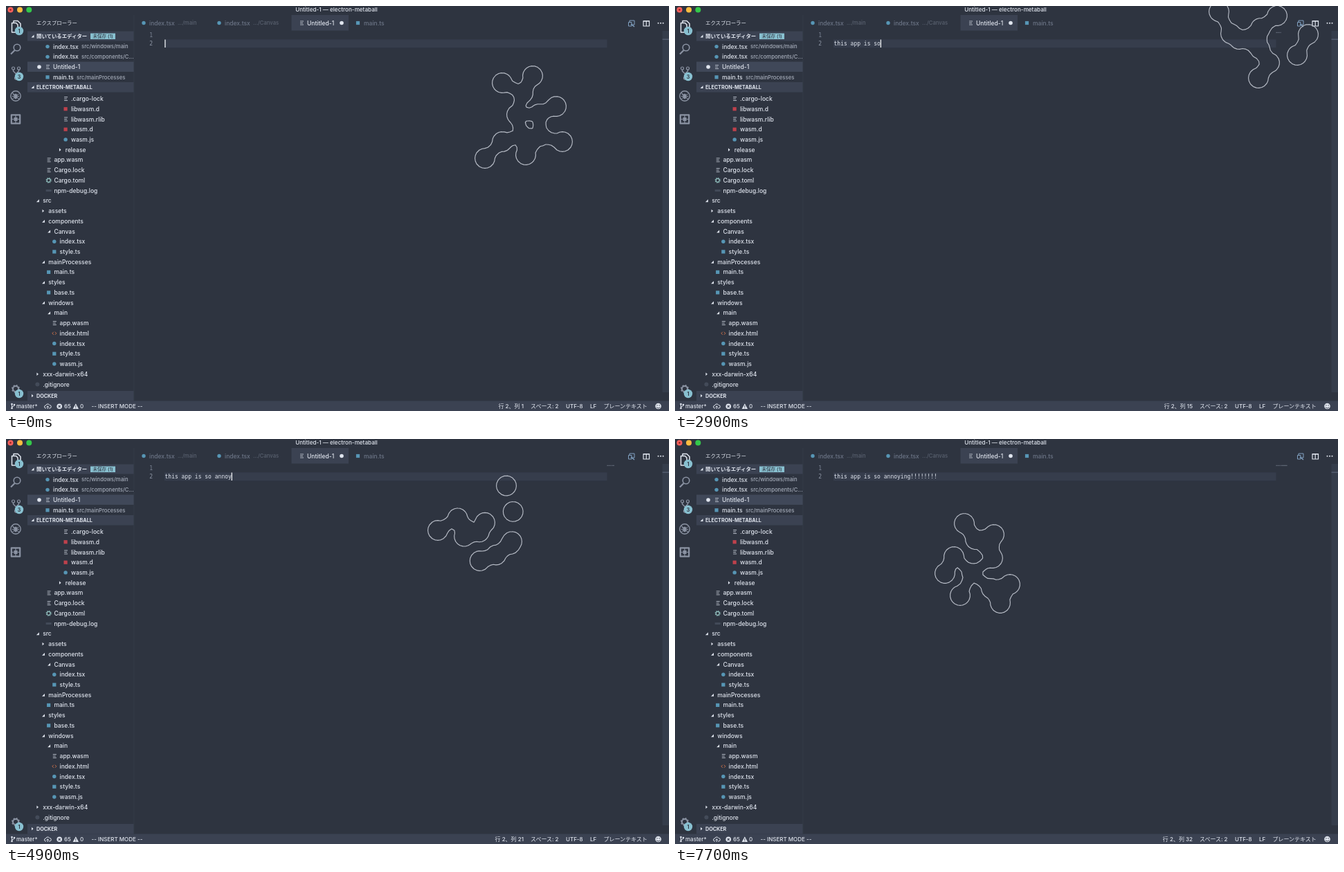
Write an HTML page that moves like this. It is 958 by 585 pixels and loops after 7.8 s.

```html
<!DOCTYPE html>
<html lang="ja">
<head>
<meta charset="utf-8">
<style>
html, body { margin: 0; width: 100%; height: 100%; overflow: hidden; background: #2e3440; }
svg { display: block; }
text { font-family: Inter, "Noto Sans CJK JP", "Noto Sans CJK", sans-serif; font-weight: 500; white-space: pre; }
.mono { font-family: "DejaVu Sans Mono", monospace; font-weight: 400; }
.bold { font-weight: 700; }
</style>
</head>
<body>
<svg id="stage" width="958" height="585" viewBox="0 0 958 585"></svg>
<script>
const stage = document.getElementById('stage');
const BG = '#2e3440', PANEL = '#3b4252', FG = '#e0e5ee', TEAL = '#88c0d0', DIM = '#6c7586', BLUE = '#5796b5';

function add(tag, attrs, content = '') {
  const el = document.createElementNS('http://www.w3.org/2000/svg', tag);
  for (const key in attrs) el.setAttribute(key, attrs[key]);
  el.textContent = content;
  return stage.appendChild(el);
}
const rect = (x, y, width, height, fill) => add('rect', { x, y, width, height, fill });
const dot = (cx, cy, r, fill) => add('circle', { cx, cy, r, fill });
const line = (d, stroke = FG, width = 1) =>
  add('path', { d, stroke, fill: 'none', 'stroke-width': width, 'stroke-linejoin': 'round' });
// y is the middle of the line of text
const label = (x, y, s, size = 8.5, fill = FG, more = {}) =>
  add('text', { x, y: y + size * 0.36, 'font-size': size, fill, ...more }, s);
const BOLD = { class: 'bold' };

const icons = {
  file: (x, y) => line(`M${x - 2} ${y - 2.5}h5M${x - 2} ${y}h4M${x - 2} ${y + 2.5}h5`, '#c3c9d4', 0.9),
  react: (x, y) => dot(x, y, 2.7, BLUE),
  ts: (x, y) => rect(x - 2.6, y - 2.6, 5.2, 5.2, BLUE),
  d: (x, y) => rect(x - 2.6, y - 2.6, 5.2, 5.2, '#bf414c'),
  npm: (x, y) => rect(x - 4, y - 1.5, 8, 3, '#434b59'),
  git: (x, y) => dot(x, y, 3, '#434b59'),
  html: (x, y) => line(`M${x - 1} ${y - 2}l-2 2l2 2M${x + 1} ${y - 2}l2 2l-2 2`, '#c9704b'),
  gear: (x, y) => gear(x, y, 2.5, '#8fbcbb', 1.2),
  open: (x, y) => add('path', { d: `M${x + 2.5} ${y - 2}v4h-4z`, fill: FG }),
  shut: (x, y) => add('path', { d: `M${x - 1} ${y - 2.3}l2.6 2.3l-2.6 2.3z`, fill: FG })
};
function gear(x, y, r, color, width) {
  add('circle', { cx: x, cy: y, r, fill: 'none', stroke: color, 'stroke-width': width });
  add('circle', { cx: x, cy: y, r: r + 1, fill: 'none', stroke: color, 'stroke-width': width,
    'stroke-dasharray': `${(r + 1) * Math.PI / 8}` });
}
function badge(y, s) {
  dot(19, y, 6.2, TEAL);
  label(19, y, s, 7, BG, { 'text-anchor': 'middle', ...BOLD });
}

function drawWindow() {
  rect(0, 0, 958, 585, BG);
  dot(6.5, 5.5, 4, '#fc615c');
  dot(6.5, 5.5, 1.3, '#8e2420');
  dot(20, 5.5, 4, '#fdbc40');
  dot(33.3, 5.5, 4, '#34c84a');
  label(477.5, 5.5, 'Untitled-1 — electron-metaball', 8.15, FG, { 'text-anchor': 'middle' });
  rect(184.5, 13, 0.8, 557, '#353c4a');
}

function drawActivityBar() {
  const grey = '#8b93a3';
  line('M11 24V21.500H17L21 25.500V34H18M8.500 24.500H14.500L17 27V38H8.500Z', FG, 1.5);
  badge(36, '1');
  add('circle', { cx: 16, cy: 60, r: 4.8, fill: 'none', stroke: grey, 'stroke-width': 1.6 });
  line('M12.500 64L7 69.500', grey, 2.2);
  line('M10.500 92V94L14.500 98V103M18.500 92V94L14.500 98', grey, 1.5);
  for (const [x, y] of [[10.5, 90], [18.5, 90], [14.5, 104]])
    add('circle', { cx: x, cy: y, r: 2, fill: BG, stroke: grey, 'stroke-width': 1.2 });
  badge(102, '3');
  add('circle', { cx: 14, cy: 130, r: 7.2, fill: 'none', stroke: grey, 'stroke-width': 1.4 });
  add('ellipse', { cx: 14, cy: 130.5, rx: 2.4, ry: 3.8, fill: grey });
  line('M9.500 127L18.500 134M9.500 134L18.500 127M9 130.500H19M9 125L19 135', grey, 1);
  line('M7.800 157.300H20.200V169.700H7.800Z', grey, 2.2);
  line('M14 157V161M14 166V170M8 163.500H11.500M16.500 163.500H20', grey, 1.2);
  rect(11.5, 161, 5, 5, grey);
  gear(14, 553, 4, grey, 2);
  badge(560, '1');
}

function drawSidebar() {
  label(44, 24.5, 'エクスプローラー', 7.4);
  rect(31, 36.5, 153.5, 14, PANEL);
  icons.open(38, 43.5);
  label(44, 43.5, '開いているエディター', 7.4, FG, BOLD);
  rect(122, 39.5, 36, 8.5, TEAL);
  label(140, 43.7, '未保存 (1)', 6.6, BG, { 'text-anchor': 'middle' });

  rect(31, 80.5, 153.5, 14.5, '#404859');
  dot(48, 88, 2.8, FG);
  const editors = [['react', 'index.tsx', 109, 'src/windows/main'], ['react', 'index.tsx', 109, 'src/components/C...'],
    ['file', 'Untitled-1', 0, ''], ['ts', 'main.ts', 102, 'src/mainProcesses']];
  editors.forEach(([icon, name, x, path], i) => {
    const y = 58.6 + i * 14.73;
    icons[icon](60, y);
    label(68, y, name);
    label(x, y, path, 7.7, '#a7aebb');
  });

  rect(31, 110, 153.5, 14.5, PANEL);
  icons.open(38, 117);
  label(44, 117, 'ELECTRON-METABALL', 7.2, FG, BOLD);

  const tree = `4 file .cargo-lock|4 d libwasm.d|4 file libwasm.rlib|4 d wasm.d|4 react wasm.js|3 shut release
1 file app.wasm|1 file Cargo.lock|1 gear Cargo.toml|1 npm npm-debug.log|-1 open src|0 shut assets|0 open components
1 open Canvas|2 react index.tsx|2 ts style.ts|0 open mainProcesses|1 ts main.ts|0 open styles|1 ts base.ts
0 open windows|1 open main|2 file app.wasm|2 html index.html|2 react index.tsx|2 ts style.ts|2 react wasm.js
-1 shut xxx-darwin-x64|-1 git .gitignore`;
  tree.split(/[|\n]/).forEach((row, i) => {
    const [depth, icon, name] = row.split(' ');
    const x = 61.3 + depth * 8.15, y = 134 + i * 14.73;
    icons[icon](x - 7.8, y);
    label(x, y, name);
  });

  rect(31, 556, 153.5, 14.5, PANEL);
  icons.shut(38, 563);
  label(44, 563, 'DOCKER', 7.2, FG, BOLD);
}

function drawEditor() {
  rect(412.5, 13, 82.5, 22.5, PANEL);
  icons.react(199, 24.5);
  label(207, 24.5, 'index.tsx', 8.5, DIM);
  label(248, 24.5, '.../main', 7.7, '#59616f');
  icons.react(308, 24.5);
  label(316, 24.5, 'index.tsx', 8.5, DIM);
  label(357, 24.5, '.../Canvas', 7.7, '#59616f');
  icons.file(427, 24.5);
  label(435, 24.5, 'Untitled-1');
  dot(485, 24.5, 2.8, FG);
  icons.ts(508.5, 24.5);
  label(517, 24.5, 'main.ts', 8.5, DIM);

  line('M901 23V21H908V27H905M899.500 23.500H904V29H899.500Z', '#81a1c1');
  line('M903 26L908 30', '#81a1c1', 1.4);
  line('M921 21.500H929.500V29H921ZM925.200 21.500V29', FG, 1.2);
  line('M921 21.800H929.500', FG, 1.6);
  for (const x of [942.5, 946, 949.5]) dot(x, 24.8, 1, FG);

  rect(229, 48.3, 639.5, 11.8, '#363d4c');
  rect(948.5, 36, 9.5, 522, '#353d4b');
  rect(948.5, 47.5, 9.5, 1.3, '#596275');
  label(212, 42, '1', 8, '#7b8494', { class: 'mono', 'text-anchor': 'end' });
  label(212, 54, '2', 8, '#8f97a6', { class: 'mono', 'text-anchor': 'end' });
}

function drawStatusBar() {
  rect(0, 570.5, 958, 14.5, PANEL);
  line('M8.500 575.500V581M12 576.500C12 579 8.500 578 8.500 580', FG);
  dot(8.5, 575, 1.3, FG);
  dot(12, 576, 1.3, FG);
  dot(8.5, 581, 1.3, FG);
  label(15, 578, 'master*', 8);
  line('M58 581H57.500A2 2 0 0 1 57.500 577A3 3 0 0 1 63 576.500A2.200 2.200 0 0 1 63 581H62M60.200 582V578M58.500 579.500L60.200 577.800L62 579.500', FG);
  dot(77.2, 578.3, 3.8, FG);
  line('M75.700 576.800L78.700 579.800M78.700 576.800L75.700 579.800', PANEL, 1.1);
  label(84, 578, '65', 8);
  add('path', { d: 'M100.800 574.300L105 582H96.600Z', fill: FG });
  line('M100.800 577V579.500M100.800 580.300V581.200', PANEL, 1);
  label(107, 578, '0', 8);
  label(123.5, 578, '-- INSERT MODE --', 8);
  label(758, 578, 'スペース: 2', 8);
  label(809, 578, 'UTF-8', 8);
  label(844, 578, 'LF', 8);
  label(863.5, 578, 'プレーンテキスト', 8);
  dot(942.5, 578, 4.3, FG);
  dot(940.9, 576.8, 0.7, PANEL);
  dot(944.1, 576.8, 0.7, PANEL);
  line('M940 579.200A2.700 2.700 0 0 0 945 579.200', PANEL, 1);
}

drawWindow();
drawActivityBar();
drawSidebar();
drawEditor();
drawStatusBar();

const position = label(748, 578, '', 8, FG, { 'text-anchor': 'end' });
const typed = label(229.5, 54, '', 8, FG, { class: 'mono' });
const caret = rect(229, 48.5, 1.3, 11.5, '#f0f2f5');
const minimap = line('', '#818999', 0.9);
const outline = line('', '#b8bdc7', 1.15);
outline.setAttribute('stroke-linecap', 'round');

const LOOP = 7800, STEP = 100;
const MESSAGE = 'this app is so annoying!!!!!!!!';
const typing = [[0, 0], [500, 0], [1800, 10], [2900, 14], [4100, 17], [5700, 23], [6500, 27], [7100, 31], [LOOP, 31]];

function typedLength(t) {
  const i = typing.findIndex(k => k[0] > t);
  const [t0, n0] = typing[i - 1], [t1, n1] = typing[i];
  return Math.floor(n0 + (n1 - n0) * (t - t0) / (t1 - t0) + 1e-6);
}

// Ball centres as x, y pairs at each pose; balls closer than LINK are bridged
const BALLS = 12, RADIUS = 14.4, LINK = 37.5;
const poses = [
  { t: 0, at: [761, 101, 795, 145, 804, 196, 772, 188, 751, 215, 692, 220, 717, 196, 717, 111, 747, 126, 738, 157, 770, 156, 745, 187] },
  { t: 1800, at: [912, 28, 930, 58, 959, 75, 914, 80, 927, 97, 883, 104, 870, 62, 887, 34, 862, 11] },
  { t: 2900, at: [846, 32, 915, 41, 899, 71, 859, 82, 843, 104, 845, 62, 815, 48, 786, 8, 803, 40, 870, 14] },
  { t: 4100, at: [803, 56, 825, 91, 810, 121, 790, 98, 780, 149, 755, 140, 721, 101, 697, 86, 723, 71, 763, 119, 756, 86] },
  { t: 5700, at: [636, 94, 643, 126, 659, 181, 667, 215, 636, 196, 614, 214, 603, 186, 558, 172, 586, 166, 612, 154, 636, 160] },
  { t: 6500, at: [581, 199, 607, 207, 646, 250, 624, 266, 600, 288, 555, 282, 538, 253, 544, 191, 560, 229, 586, 264, 603, 238] },
  { t: 7700, at: [418, 122, 461, 138, 459, 172, 484, 210, 470, 237, 412, 226, 390, 194, 403, 170, 434, 145, 429, 194, 457, 216] }
];
// Spare balls merge with the last one listed
for (const { at } of poses)
  while (at.length < BALLS * 2) at.push(...at.slice(-2));

function slope(i, j) {
  const a = poses[Math.max(i - 1, 0)], b = poses[Math.min(i + 1, poses.length - 1)];
  return (b.at[j] - a.at[j]) / (b.t - a.t);
}

// Cubic Hermite path through the poses
function coordinate(t, j) {
  const i = poses.findLastIndex(p => p.t <= Math.min(t, 7699));
  const a = poses[i], b = poses[i + 1], span = b.t - a.t, u = Math.min(1, (t - a.t) / span);
  const v = 1 - u;
  return v * v * ((1 + 2 * u) * a.at[j] + u * span * slope(i, j)) +
    u * u * ((3 - 2 * u) * b.at[j] - v * span * slope(i + 1, j));
}

// Every ball is a link to itself; longer links have a thinner waist
function findLinks(balls) {
  const links = [];
  balls.forEach(([x, y], i) => {
    for (const [x2, y2] of balls.slice(i)) {
      const dx = x2 - x, dy = y2 - y, d2 = dx * dx + dy * dy;
      if (d2 < LINK * LINK) links.push({ x, y, dx, dy, d2: d2 || 1, waist: 2 * d2 / (LINK * LINK) });
    }
  });
  return links;
}

function depth(px, py, links) {
  let best = -1e3;
  for (const { x, y, dx, dy, d2, waist } of links) {
    const u = Math.max(0, Math.min(1, ((px - x) * dx + (py - y) * dy) / d2));
    const reach = RADIUS * (1 - waist * u * (1 - u));
    best = Math.max(best, reach - Math.hypot(px - x - u * dx, py - y - u * dy));
  }
  return best;
}

// Marching squares along the edge of all links
function contour(links) {
  const G = 4, cols = 241, rows = 90, field = [];
  for (let r = 0; r < rows; r++)
    for (let c = 0; c < cols; c++) field.push(depth(c * G, r * G, links));
  const corners = [[0, 0], [1, 0], [1, 1], [0, 1]];
  let d = '';
  for (let r = 0; r < rows - 1; r++) for (let c = 0; c < cols - 1; c++) {
    const value = corners.map(([x, y]) => field[(r + y) * cols + c + x]);
    const hits = [];
    for (let k = 0; k < 4; k++) {
      const n = (k + 1) % 4;
      if (value[k] > 0 === value[n] > 0) continue;
      const f = value[k] / (value[k] - value[n]), [x0, y0] = corners[k], [x1, y1] = corners[n];
      hits.push(`${((c + x0 + (x1 - x0) * f) * G).toFixed(1)} ${((r + y0 + (y1 - y0) * f) * G).toFixed(1)}`);
    }
    for (let k = 0; k < hits.length; k += 2) d += `M${hits[k]}L${hits[k + 1]}`;
  }
  return d;
}

function draw(t) {
  const n = typedLength(t);
  typed.textContent = MESSAGE.slice(0, n);
  position.textContent = `行 2、列 ${n + 1}`;
  caret.setAttribute('x', 229.3 + n * 4.816);
  caret.setAttribute('visibility', t < 7600 ? 'visible' : 'hidden');
  const marks = [...MESSAGE.slice(0, n)].map((ch, i) => ch === ' ' ? '' : `M${868.5 + i * 0.52} 38.300h.5`);
  minimap.setAttribute('d', marks.join(''));
  const balls = Array.from({ length: BALLS }, (_, i) => [coordinate(t, 2 * i), coordinate(t, 2 * i + 1)]);
  outline.setAttribute('d', contour(findLinks(balls)));
}

const start = performance.now();
let shown = -1;
function tick() {
  const t = Math.floor((performance.now() - start) % LOOP / STEP) * STEP;
  if (t !== shown) draw(shown = t);
  requestAnimationFrame(tick);
}
tick();
</script>
</body>
</html>
```
